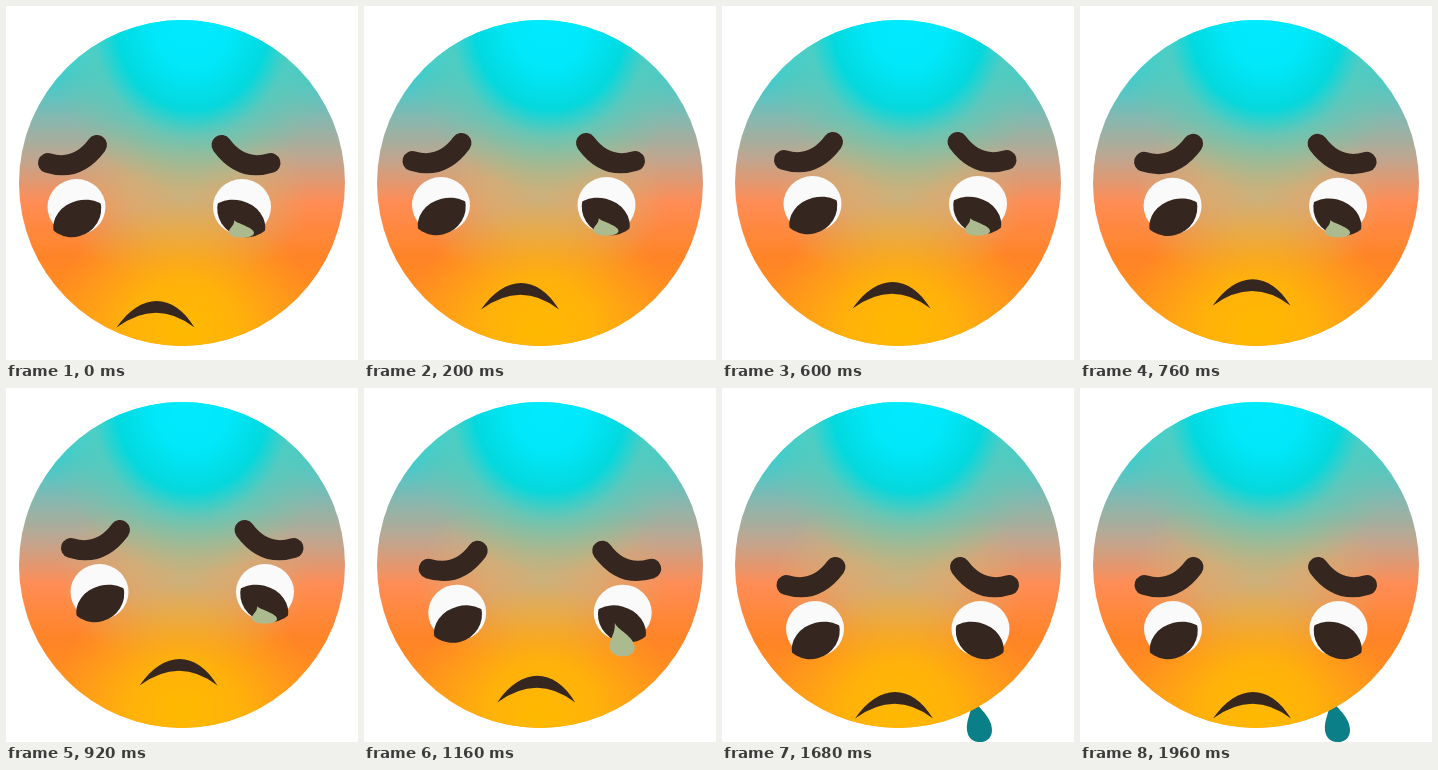
Write an HTML page that moves like this. It is 352 px wide and 354 px high and loops after 2000 ms.

```html
<!DOCTYPE html>
<html lang="en">
<head>
<meta charset="utf-8">
<title>Sad face</title>
<style>
html, body { margin: 0; width: 352px; height: 354px; overflow: hidden; background: #fff; }
svg { display: block; }
.dark { fill: #35261f; }
.brow { fill: none; stroke: #35261f; stroke-width: 20; stroke-linecap: round; }
</style>
</head>
<body>
<svg width="352" height="354" viewBox="0 0 352 354">
  <defs>
    <linearGradient id="skin" gradientUnits="userSpaceOnUse" x1="0" y1="13" x2="0" y2="341">
      <stop offset="0" stop-color="#00eaff"/>
      <stop offset=".17" stop-color="#35cfd2"/>
      <stop offset=".3" stop-color="#84b8b0"/>
      <stop offset=".43" stop-color="#c2a58e"/>
      <stop offset=".56" stop-color="#ff8c55"/>
      <stop offset=".73" stop-color="#ff8426"/>
      <stop offset="1" stop-color="#ff9c14"/>
    </linearGradient>
    <radialGradient id="olive">
      <stop offset="0" stop-color="#c3b882" stop-opacity=".85"/>
      <stop offset=".45" stop-color="#cbb67a" stop-opacity=".65"/>
      <stop offset="1" stop-color="#cbb67a" stop-opacity="0"/>
    </radialGradient>
    <radialGradient id="gold">
      <stop offset="0" stop-color="#ffb900"/>
      <stop offset=".4" stop-color="#ffb508" stop-opacity=".9"/>
      <stop offset="1" stop-color="#ffab18" stop-opacity="0"/>
    </radialGradient>
    <radialGradient id="cold">
      <stop offset="0" stop-color="#00eaff"/>
      <stop offset=".25" stop-color="#00e8fa"/>
      <stop offset=".5" stop-color="#00d9de" stop-opacity=".95"/>
      <stop offset=".66" stop-color="#58cabc" stop-opacity=".8"/>
      <stop offset="1" stop-color="#80c0a0" stop-opacity="0"/>
    </radialGradient>
    <clipPath id="head"><circle cx="176" cy="177" r="163"/></clipPath>
    <clipPath id="ball"><ellipse cx="70.5" cy="201" rx="29" ry="28"/></clipPath>
    <clipPath id="passed"><rect id="wet" width="352" height="0"/></clipPath>
    <path id="drop" d="M0 0C2 9 20 19 20 34C20 43 13 47 6 46C-2 45 -6 38 -5 29C-4 20 1 13 0 0Z"/>
    <g id="side">
      <path class="brow" d="M42 157Q71 166 91 139"/>
      <ellipse cx="70.5" cy="201" rx="29" ry="28" fill="#fafafa"/>
      <ellipse class="dark" cx="77" cy="219" rx="30" ry="25" transform="rotate(-14 77 219)" clip-path="url(#ball)"/>
    </g>
  </defs>
  <g clip-path="url(#passed)">
    <use href="#drop" x="250" y="308" fill="#0b7f88"/>
  </g>
  <g clip-path="url(#head)">
    <rect width="352" height="354" fill="url(#skin)"/>
    <ellipse cx="178" cy="190" rx="125" ry="95" fill="url(#olive)"/>
    <ellipse cx="178" cy="325" rx="135" ry="130" fill="url(#gold)"/>
    <ellipse cx="186" cy="20" rx="150" ry="168" fill="url(#cold)"/>
    <g id="eyes">
      <use href="#side"/>
      <use href="#side" transform="translate(306.5) scale(-1 1)"/>
    </g>
    <path id="mouth" class="dark" d="M111 321.500C135 286 168 286 189 321.500Q151 292 111 321.500Z"/>
    <use id="tear" href="#drop" fill="#abbb8f"/>
  </g>
</svg>
<script>
const $ = id => document.getElementById(id);
const LOOP = 2000, STEP = 40;

// Each track is a list of [time, value]
const slide = [[0, 0], [200, 6.5], [600, 20], [920, 23], [1360, 22.5], [1680, 22.5]];
const eyeY = [[0, 0], [200, -2], [600, -3], [920, 3], [1360, 38], [1680, 40]];
const mouthY = [[0, 0], [200, -18], [600, -19], [920, -24], [1360, 7], [1680, 9]];
const tearY = [[0, 214], [200, 212], [600, 212], [920, 218], [1360, 262], [1560, 362]];
const tearSize = [[0, .38], [920, .38], [1360, 1]];

const slope = (k, i) => (k[i + 1][1] - k[i][1]) / (k[i + 1][0] - k[i][0]);

// Harmonic mean keeps the curve from overshooting its keys
function tangent(k, i) {
  if (i === 0) return slope(k, 0);
  if (i === k.length - 1) return 0;
  const a = slope(k, i - 1), b = slope(k, i);
  return a * b > 0 ? 2 * a * b / (a + b) : 0;
}

function at(k, t) {
  const i = k.findIndex(p => p[0] > t) - 1;
  if (i < 0) return k[k.length - 1][1];
  const d = k[i + 1][0] - k[i][0], u = (t - k[i][0]) / d;
  const ease = u * u * (3 - 2 * u);
  return k[i][1] * (1 - ease) + k[i + 1][1] * ease
    + d * u * (1 - u) * ((1 - u) * tangent(k, i) - u * tangent(k, i + 1));
}

const place = (id, x, y, s = 1) =>
  $(id).setAttribute('transform', `translate(${x} ${y}) scale(1 ${s})`);

function draw(now) {
  const t = Math.floor(now % LOOP / STEP) * STEP;
  const x = at(slide, t), drop = at(tearY, t), size = at(tearSize, t);
  place('eyes', x, at(eyeY, t));
  place('mouth', x - .5, at(mouthY, t));
  place('tear', 228 + x, drop, size);
  $('wet').setAttribute('height', drop + 46 * size);
  requestAnimationFrame(draw);
}
requestAnimationFrame(draw);
</script>
</body>
</html>
```
